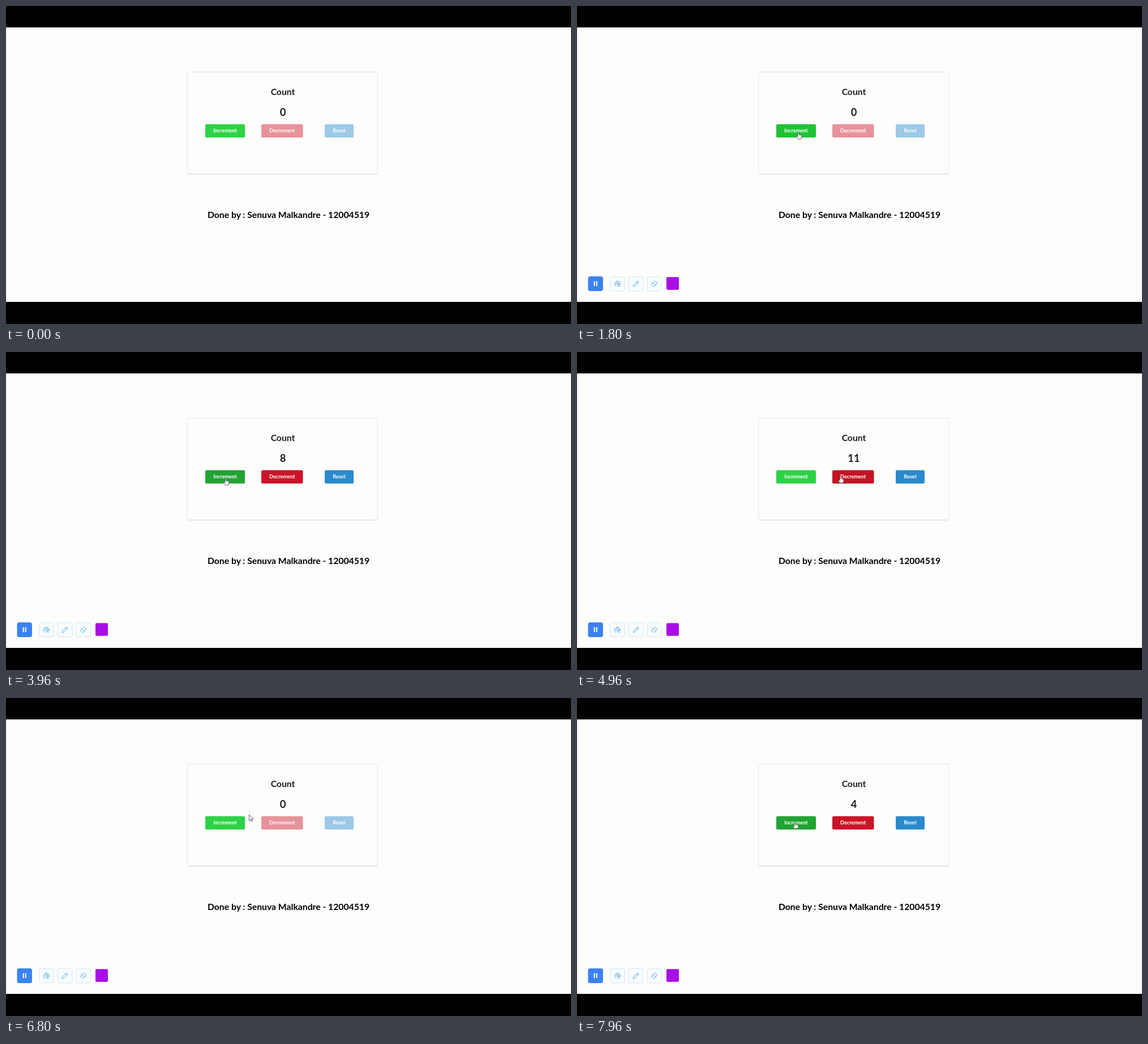
Animation of 998 by 561 pixels, one loop 8000 ms. Source, as an HTML page:

```html
<!DOCTYPE html>
<html lang="en">
<head>
<meta charset="utf-8">
<title>Counter</title>
<style>
  html, body { margin: 0; width: 100%; height: 100%; overflow: hidden; background: #000; }
  svg { display: block; width: 100vw; height: 100vh; }
  text { font-family: Lato, sans-serif; font-weight: 700; text-anchor: middle; }
  .label { font-size: 9.17px; fill: #fff; }
  .title { font-size: 15.72px; fill: #1f1f1f; }
  .tool { fill: #f7fcfd; stroke: #cfe9f3; }
  .icon { fill: none; stroke: #55aade; stroke-linecap: round; stroke-linejoin: round; }
</style>
</head>
<body>
<svg viewBox="0 0 998 561">
  <rect y="37.5" width="998" height="484.5" fill="#fdfdfc"/>
  <path d="M.5 38V522M997.5 38V522" stroke="#e9e9ee"/>

  <rect x="321" y="117.4" width="336" height="180" rx="3" fill="#dcdce6" opacity=".7"/>
  <rect x="320.5" y="116.5" width="336" height="179.5" rx="3" fill="#fdfdfc" stroke="#e3e3f0"/>
  <text class="title" x="489" y="156.5">Count</text>
  <text id="count" x="489" y="194.4" font-size="18.34" fill="#1f1f1f">0</text>
  <g id="buttons"></g>
  <text class="title" x="499" y="373.8" style="fill:#000">Done by : Senuva Malkandre - 12004519</text>

  <g id="toolbar">
    <rect x="19.5" y="477" width="26.5" height="26" rx="4" fill="#3b82f1"/>
    <path d="M30.7 485.5v8.5M34.8 485.5v8.5" stroke="#fff" stroke-width="2"/>
    <rect class="tool" x="58.5" y="477.5" width="26" height="25" rx="3"/>
    <rect class="tool" x="91" y="477.5" width="26" height="25" rx="3"/>
    <rect class="tool" x="124" y="477.5" width="26" height="25" rx="3"/>
    <path class="icon" d="M68.2 494.6A5.2 5.2 0 1 1 76.6 491M69.2 491.8A2.9 2.9 0 1 1 74.2 489.4M71.2 489.4l1.4 5.4 1.1-1.8 2 1.9M72 489.4l3.8 1.6-2 1"/>
    <path class="icon" d="M99.4 494.6l.7-3 6-6a1.2 1.2 0 0 1 1.8 0l.5.5a1.2 1.2 0 0 1 0 1.8l-6 6zM105 486.8l2.2 2.2"/>
    <path class="icon" d="M132.3 490l4.4-4.2a1.4 1.4 0 0 1 2 0l2.3 2.3a1.4 1.4 0 0 1 0 2l-4.4 4.2h-2l-2.3-2.3a1.4 1.4 0 0 1 0-2zM134.6 488l4.2 4.2"/>
    <rect x="158" y="478.3" width="22" height="22.4" rx="2" fill="#aa0de6"/>
  </g>

  <g id="cursor" fill="#fff" stroke="#222" stroke-width=".7" stroke-linejoin="round">
    <path id="arrow" d="M0 0V10.6L2.5 8.3 4.1 12 5.8 11.2 4.2 7.6H7.5Z"/>
    <path id="hand" d="M-1 .8Q0-.6 1 .8V4.2Q2.2 3.4 3 4.7 4.1 4 4.7 5.2 6 4.8 6 6.2V8.6L4.9 11.6H-.9L-3.6 7.6Q-3.4 6-1.9 6.6L-1 7.4Z"/>
  </g>
  <path d="M0 0H998V37.5H0ZM0 522H998V561H0Z"/>
</svg>
<script>
const LOOP = 8000, PERIOD = 180, HOLD = 115, FADE = 100;
const RESET_DOWN = 5720, RESET_UP = 5880;
const TOP = 208.5, HEIGHT = 23.5;
const $ = id => document.getElementById(id);
const clamp = (v, lo, hi) => Math.min(hi, Math.max(lo, v));

// First release and number of clicks in each burst on Increment
const bursts = [{ start: 2550, clicks: 11 }, { start: 7270, clicks: 5 }];

// Colours: normal, hover, pressed
const buttons = [
  { label: 'Increment', x: 352, w: 70, colors: [[45, 210, 70], [32, 194, 55], [34, 160, 51]] },
  { label: 'Decrement', x: 451, w: 73.5, colors: [[203, 20, 40], [190, 16, 34], [165, 20, 36]] },
  { label: 'Reset', x: 563, w: 51, colors: [[42, 138, 204], [30, 124, 190], [29, 110, 163]] }
];

// Cursor moves: start, end, from, to, upward bow
const moves = [
  [450, 1450, [640, 20], [391, 223], 0],
  [1900, 2450, [391, 223], [388, 223], 0],
  [4600, 5500, [388, 223], [606, 213], 0],
  [6300, 7004, [606, 213], [385, 219], 20]
];

for (const b of buttons) {
  $('buttons').insertAdjacentHTML('beforeend',
    `<g><rect x="${b.x}" y="${TOP}" width="${b.w}" height="${HEIGHT}" rx="2.6"/>
     <text class="label" x="${b.x + b.w / 2}" y="223.4">${b.label}</text></g>`);
  b.group = $('buttons').lastElementChild;
  b.rect = b.group.querySelector('rect');
}

function cursorAt(t) {
  const [a, z, from, to, bow] = moves.findLast(m => t >= m[0]) || moves[0];
  const u = clamp((t - a) / (z - a), 0, 1);
  const p = u * u * (3 - 2 * u);
  return [from[0] + (to[0] - from[0]) * p,
          from[1] + (to[1] - from[1]) * p - bow * Math.sin(Math.PI * p)];
}

function countAt(t) {
  const { start, clicks } = bursts[t < RESET_UP ? 0 : 1];
  return clamp(Math.floor((t - start) / PERIOD) + 1, 0, clicks);
}

function pressedAt(b, t) {
  if (b === buttons[2]) return t >= RESET_DOWN && t < RESET_UP;
  return b === buttons[0] && bursts.some(({ start, clicks }) => {
    const k = (t - start + HOLD) / PERIOD;
    return k >= 0 && k < clicks && k % 1 < HOLD / PERIOD;
  });
}

const enabledAt = (b, t) => b === buttons[0] || countAt(t) > 0;

function hoveredAt(b, t) {
  const [x, y] = cursorAt(t);
  return enabledAt(b, t) && x >= b.x && x <= b.x + b.w && y >= TOP && y <= TOP + HEIGHT;
}

function lookAt(b, t) {
  const color = b.colors[pressedAt(b, t) ? 2 : hoveredAt(b, t) ? 1 : 0];
  return [...color, enabledAt(b, t) ? 1 : 0.45];
}

// Averaging the recent past gives a linear transition
function fadedLook(b, t) {
  const steps = 10, sum = [0, 0, 0, 0];
  for (let i = 0; i < steps; i++) {
    lookAt(b, Math.max(0, t - i * FADE / steps)).forEach((v, j) => sum[j] += v / steps);
  }
  return sum;
}

const show = (id, on) => $(id).setAttribute('visibility', on ? 'visible' : 'hidden');

function draw(t) {
  $('count').textContent = countAt(t);
  for (const b of buttons) {
    const [r, g, bl, opacity] = fadedLook(b, t);
    b.rect.setAttribute('fill', `rgb(${r},${g},${bl})`);
    b.group.setAttribute('opacity', opacity);
  }
  const over = buttons.some(b => hoveredAt(b, t));
  $('cursor').setAttribute('transform', `translate(${cursorAt(t)})`);
  show('hand', t >= 450 && over);
  show('arrow', t >= 450 && !over);
  show('toolbar', t >= 400);
}

const begin = performance.now();
function tick() {
  draw((performance.now() - begin) % LOOP);
  requestAnimationFrame(tick);
}
tick();
</script>
</body>
</html>
```
